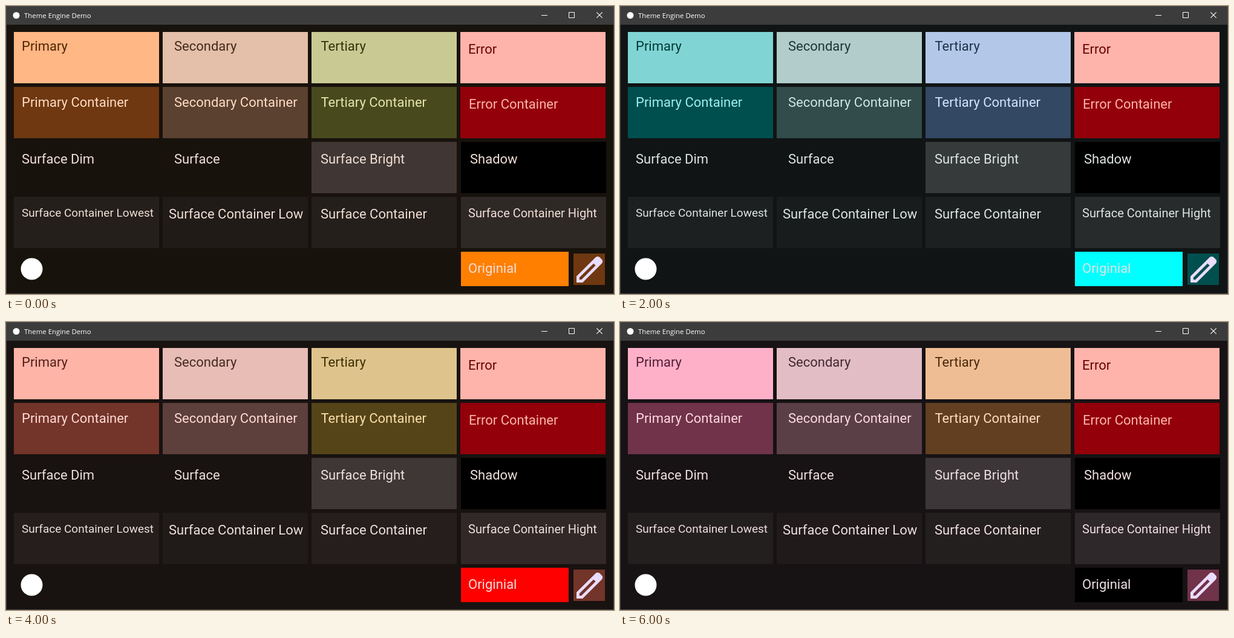
Animation, 1005 px wide and 477 px high, one loop 7000 ms. Source, as an HTML page:

```html
<!DOCTYPE html>
<html lang="en">
<head>
<meta charset="utf-8">
<title>Theme Engine Demo</title>
<style>
html, body { margin: 0; width: 100%; height: 100%; overflow: hidden; background: #171210; }
svg { display: block; width: 1005px; height: 477px; font: 22px Roboto, sans-serif; animation: theme 7s step-end infinite; }

.bg { fill: var(--bg); }
.p { fill: var(--p); }    .on-p { fill: var(--on-p); }
.pc { fill: var(--pc); }  .on-pc { fill: var(--on-pc); }
.s { fill: var(--s); }    .on-s { fill: var(--on-s); }
.sc { fill: var(--sc); }  .on-sc { fill: var(--on-sc); }
.t { fill: var(--t); }    .on-t { fill: var(--on-t); }
.tc { fill: var(--tc); }  .on-tc { fill: var(--on-tc); }
.e { fill: #ffb4ab; }     .on-e { fill: #690005; }
.ec { fill: #93000a; }    .on-ec { fill: #ffb4ab; }
.bright { fill: var(--bright); }
.low { fill: var(--low); }
.mid { fill: var(--mid); }
.high { fill: var(--high); }
.text { fill: var(--text); }
.seed { fill: var(--seed); }
.title { font: 11.4px "Open Sans", sans-serif; fill: #fff; }
.line { fill: none; stroke: #fff; }

@keyframes theme {
  0%, 100% {
    --bg: #18120d; --p: #ffb785; --on-p: #4f2500; --pc: #6f3810; --on-pc: #ffdcc5;
    --s: #e4bfa9; --on-s: #422b1b; --sc: #5b4130; --on-sc: #ffdcc5;
    --t: #c9ca93; --on-t: #313209; --tc: #484a1e; --on-tc: #e5e6ad;
    --bright: #403734; --low: #201b17; --mid: #241f1b; --high: #2f2926; --text: #f0dfd6; --seed: #ff7f00;
  }
  14.285714% {
    --bg: #131315; --p: #c2c1ff; --on-p: #2a2a60; --pc: #424178; --on-pc: #e2dfff;
    --s: #c7c4dc; --on-s: #2f2f42; --sc: #464559; --on-sc: #e3e0f9;
    --t: #e9b9d3; --on-t: #46263a; --tc: #5f3c51; --on-tc: #ffd8eb;
    --bright: #39393b; --low: #1c1b1f; --mid: #201f23; --high: #2a292e; --text: #e5e1e9; --seed: #807fbf;
  }
  28.571429% {
    --bg: #101415; --p: #80d5d4; --on-p: #003737; --pc: #004f4f; --on-pc: #9cf1f0;
    --s: #b1cccb; --on-s: #1c3535; --sc: #324b4b; --on-sc: #cce8e7;
    --t: #b3c8e8; --on-t: #1c314b; --tc: #334863; --on-tc: #d3e4ff;
    --bright: #363a3a; --low: #181c1d; --mid: #1d2021; --high: #272b2b; --text: #dee4e3; --seed: #0ff;
  }
  42.857143% {
    --bg: #14140e; --p: #cbcb77; --on-p: #333200; --pc: #4a4900; --on-pc: #e7e78f;
    --s: #cac8a5; --on-s: #323218; --sc: #49482c; --on-sc: #e7e4bf;
    --t: #a4d0be; --on-t: #0b372a; --tc: #254e40; --on-tc: #c0ecda;
    --bright: #3a3834; --low: #1c1c17; --mid: #20201b; --high: #2b2a27; --text: #e6e2d9; --seed: #ff0;
  }
  57.142857% {
    --bg: #181210; --p: #ffb4a8; --on-p: #561e16; --pc: #73342a; --on-pc: #ffdad4;
    --s: #e7bdb6; --on-s: #442925; --sc: #5d3f3b; --on-sc: #ffdad4;
    --t: #dec48c; --on-t: #3e2e04; --tc: #564419; --on-tc: #fbdfa6;
    --bright: #3f3736; --low: #201a18; --mid: #251e1c; --high: #322827; --text: #eee0dd; --seed: #f00;
  }
  71.428571% {
    --bg: #11140f; --p: #aed18d; --on-p: #1b3704; --pc: #314f19; --on-pc: #c9eda7;
    --s: #bfcbad; --on-s: #2a331e; --sc: #404a33; --on-sc: #dbe7c8;
    --t: #a0cfce; --on-t: #003737; --tc: #1e4e4e; --on-tc: #bcecea;
    --bright: #373a35; --low: #1a1d18; --mid: #1e201c; --high: #282b28; --text: #e2e3d8; --seed: #80ff00;
  }
  85.714286% {
    --bg: #171214; --p: #ffb0c9; --on-p: #541d33; --pc: #703349; --on-pc: #ffd9e2;
    --s: #e2bdc6; --on-s: #422931; --sc: #5a3f47; --on-sc: #ffd9e2;
    --t: #efbd94; --on-t: #48290b; --tc: #623f20; --on-tc: #ffdcc1;
    --bright: #3c3639; --low: #201a1b; --mid: #241f1f; --high: #2f282b; --text: #efdfe1; --seed: #000;
  }
}
</style>
</head>
<body>
<svg viewBox="0 0 1005 477">
  <rect class="bg" width="1005" height="477"/>
  <rect width="1005" height="31" fill="#3c3c3c"/>
  <rect class="line" x=".5" y=".5" width="1004" height="476" style="stroke:#4b4b4b"/>

  <circle cx="17" cy="15.5" r="5.5" fill="#fff"/>
  <text class="title" x="30" y="20">Theme Engine Demo</text>
  <path class="line" d="M885 15.5h10M930.5 10.5h9v9h-9z"/>
  <path class="line" d="M976.3 10.3l9.4 9.4m0-9.4l-9.4 9.4" stroke-width="1.1"/>

  <rect class="p" x="13" y="43" width="240" height="85"/>
  <rect class="s" x="259" y="43" width="240" height="85"/>
  <rect class="t" x="505" y="43" width="240" height="85"/>
  <rect class="e" x="751" y="43" width="240" height="85"/>
  <text class="on-p" x="26" y="74">Primary</text>
  <text class="on-s" x="278" y="74">Secondary</text>
  <text class="on-t" x="520.5" y="74">Tertiary</text>
  <text class="on-e" x="764" y="79">Error</text>

  <rect class="pc" x="13" y="134" width="240" height="85"/>
  <rect class="sc" x="259" y="134" width="240" height="85"/>
  <rect class="tc" x="505" y="134" width="240" height="85"/>
  <rect class="ec" x="751" y="134" width="240" height="85"/>
  <text class="on-pc" x="26" y="167">Primary Container</text>
  <text class="on-sc" x="278" y="167">Secondary Container</text>
  <text class="on-tc" x="520.5" y="167">Tertiary Container</text>
  <text class="on-ec" x="765" y="170">Error Container</text>

  <rect class="bright" x="505" y="225" width="240" height="85"/>
  <rect x="752" y="225" width="240" height="85"/>
  <g class="text">
    <text x="26" y="261">Surface Dim</text>
    <text x="278" y="261">Surface</text>
    <text x="520" y="261">Surface Bright</text>
    <text x="767" y="261">Shadow</text>
  </g>

  <rect class="mid" x="13" y="316" width="240" height="85"/>
  <rect class="low" x="259" y="316" width="240" height="85"/>
  <rect class="mid" x="505" y="316" width="240" height="85"/>
  <rect class="high" x="752" y="316" width="240" height="85"/>
  <rect class="seed" x="752" y="407" width="178" height="57"/>
  <g class="text">
    <text x="26" y="349" font-size="19">Surface Container Lowest</text>
    <text x="269" y="352">Surface Container Low</text>
    <text x="520" y="352">Surface Container</text>
    <text x="764" y="350" font-size="20">Surface Container Hight</text>
    <text x="764" y="442">Originial</text>
  </g>

  <circle cx="42.5" cy="435.5" r="18" fill="#fff"/>

  <rect class="pc" x="938" y="410" width="52" height="52"/>
  <path fill="#eaddff" transform="translate(935.8 465.2) scale(.0599)" d="M200-200h57l391-391-57-57-391 391v57Zm-80 80v-170l528-527q12-11 26.500-17t30.500-6q16 0 31 6t26 18l55 56q12 11 17.500 26t5.500 30q0 16-5.500 30.500T817-647L290-120H120Z"/>
</svg>
</body>
</html>
```
